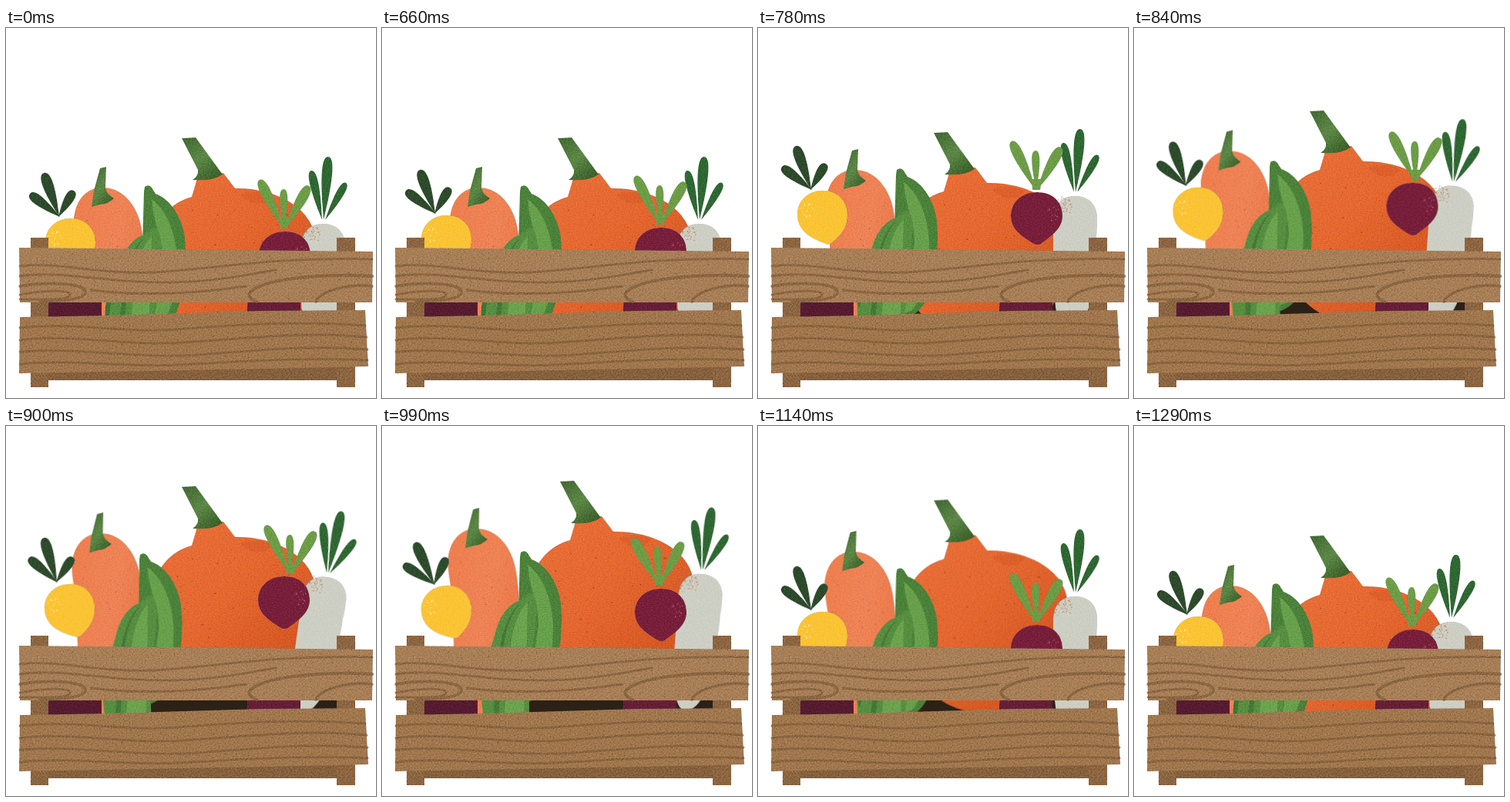
An HTML page for the animation above (1320 ms loop, 480 by 480 pixels).

```html
<!DOCTYPE html>
<html lang="en">
<head>
<meta charset="utf-8">
<title>Vegetable crate</title>
<style>
  html, body { margin: 0; width: 100%; height: 100%; overflow: hidden; background: #fff; }
  main { position: relative; width: 480px; height: 480px; max-height: 100%; overflow: hidden; contain: strict; }
  svg { position: absolute; left: 0; top: 0; width: 480px; height: 480px; }
  .part { will-change: transform; }
  .grain { filter: url(#grain); }
  .wood { filter: url(#wood); }
  .lines { fill: none; stroke: #83603b; stroke-width: 2.8; stroke-linecap: round; opacity: .8; }
</style>
</head>
<body>
<main>
<svg viewBox="0 0 480 480">
  <defs>
    <filter id="grain" filterUnits="userSpaceOnUse" x="0" y="0" width="480" height="480" color-interpolation-filters="sRGB">
      <feTurbulence type="fractalNoise" baseFrequency=".5 .7" numOctaves="2" seed="4"/>
      <feColorMatrix values=".45 0 0 0 .28  .45 0 0 0 .28  .45 0 0 0 .28  0 0 0 0 1" result="noise"/>
      <feBlend in="noise" in2="SourceGraphic" mode="soft-light"/>
      <feComposite in2="SourceGraphic" operator="in"/>
    </filter>
    <filter id="wood" filterUnits="userSpaceOnUse" x="0" y="0" width="480" height="480" color-interpolation-filters="sRGB">
      <feTurbulence type="fractalNoise" baseFrequency=".5 .7" numOctaves="2" seed="9"/>
      <feColorMatrix values=".6 0 0 0 .2  .6 0 0 0 .2  .6 0 0 0 .2  0 0 0 0 1" result="noise"/>
      <feBlend in="noise" in2="SourceGraphic" mode="soft-light"/>
      <feComposite in2="SourceGraphic" operator="in"/>
    </filter>
    <linearGradient id="stem" x1="0" y1="0" x2=".7" y2="1">
      <stop offset="0" stop-color="#3f6630"/><stop offset=".55" stop-color="#5c8845"/><stop offset="1" stop-color="#3b6129"/>
    </linearGradient>
    <linearGradient id="orange" x1="0" y1="0" x2=".9" y2=".9">
      <stop offset="0" stop-color="#ea7039"/><stop offset=".5" stop-color="#e4662e"/><stop offset="1" stop-color="#d0511c"/>
    </linearGradient>
    <linearGradient id="peach" x1="0" y1="0" x2="1" y2=".5">
      <stop offset="0" stop-color="#ee7d4c"/><stop offset=".6" stop-color="#ee8355"/><stop offset="1" stop-color="#ea7747"/>
    </linearGradient>
  </defs>
  <path fill="#2c2117" d="M55 345H429V380H55Z"/>
</svg>

<svg class="part" id="pumpkin" viewBox="0 0 480 480"><g class="grain">
  <path fill="url(#orange)" d="M300 208C350 208 392 232 400 266C408 320 385 419 297 419C215 419 185 345 186 300C187 250 215 226 241 219L248 195L282 188L297 208Z"/>
  <path fill="#cf5220" opacity=".35" d="M303 216Q325 208 346 218Q338 230 322 227Q310 225 303 216Z"/>
  <path fill="url(#stem)" d="M228 143L246 142L281 190Q268 199 242 197Q250 192 249 184Z"/>
  <g data-specks="300 300 92 60 #9c3c14"></g>
</g></svg>

<svg class="part" id="squash" viewBox="0 0 480 480"><g class="grain">
  <path fill="url(#peach)" d="M125 207C149 207 164 225 171 243C177 258 180 280 180 330V450H95L93 300C92 280 88 268 88 249C90 222 105 207 125 207Z"/>
  <path fill="url(#stem)" d="M122 182L130 180L129 208Q131 216 140 221Q133 228 122 229L111 232L114 211Z"/>
  <g data-specks="132 270 40 30 #c4582c"></g>
</g></svg>

<svg class="part" id="turnip" viewBox="0 0 480 480"><g class="grain">
  <g fill="#2d6731" data-leaves="410 249 396 185 10 412 249 418 167 12 414 249 441 201 9"></g>
  <path fill="#cecfc4" d="M411 254C429 254 440 265 440 284L437 352C434 385 426 432 402 432C388 432 384 395 383 352V284C383 265 394 254 411 254Z"/>
  <g data-specks="395 268 13 55 #b5764f"></g>
</g></svg>

<svg class="part" id="zucchini" viewBox="0 0 480 480"><g class="grain">
  <path fill="#4a8138" d="M179 212L180 206Q185 202 189 207L194 215C213 222 226 243 231 265C236 295 232 340 222 367C216 384 205 394 190 400L150 410L177 280Z"/>
  <path fill="#67a04a" d="M189 222C207 235 220 262 222 300C222 340 214 370 200 388L190 392L203 300C203 270 190 250 189 222Z"/>
  <path fill="#568e3f" d="M194 259Q199 262 201 277L191 385V420Q160 432 131 416C128 390 127 365 132 350C143 330 145 315 150 300C156 284 167 271 180 268Q186 260 194 259Z"/>
  <path fill="#3f7233" d="M132 350C138 345 143 340 146 335C138 350 134 360 134 375L131 385C128 375 127 362 132 350Z"/>
  <path fill="#6ba34d" d="M189 270C176 284 169 305 167 330L158 420L184 420L187 340C189 315 188 290 189 270Z"/>
  <path fill="#427836" d="M182 270C167 285 160 305 158 330L151 418L145 416C146 385 150 360 153 330C157 305 165 283 182 270Z"/>
</g></svg>

<svg class="part" id="yellowLeaves" viewBox="0 0 480 480"><g class="grain">
  <g fill="#2c4a2a" data-leaves="70 245 31 215 11.5 69 245 49 188 12.5 68 245 88 211 11"></g>
</g></svg>
<svg class="part" id="yellow" viewBox="0 0 480 480"><g class="grain">
  <path fill="#fac433" d="M84 247C103 247 116 260 116 278C116 298 104 308 95 315Q91 318 86 315C66 308 51 297 51 278C51 260 65 247 84 247Z"/>
  <g data-specks="63 272 10 22 #fff0b8"></g>
</g></svg>

<svg class="part" id="purpleLeaves" viewBox="0 0 480 480"><g class="grain">
  <g fill="#6c9d45" data-leaves="360 260 329 197 12 361 260 360 209 9 362 260 393 205 12"></g>
  <path fill="#6c9d45" d="M355 246H368L366 260H356Z"/>
</g></svg>
<svg class="part" id="purple" viewBox="0 0 480 480"><g class="grain">
  <path fill="#771d39" d="M362 264C383 264 395 277 395 295C395 312 379 322 367 331Q362 334 356 330C342 321 328 312 328 295C328 277 342 264 362 264Z"/>
  <g data-specks="384 292 10 18 #c08a8c"></g>
</g></svg>

<svg viewBox="0 0 480 480">
  <g class="grain" fill="#551a2e"><path d="M55 345H124V380H55Z"/><path fill="#661c36" d="M314 345H382V380H312Z"/></g>
  <g class="wood">
    <path fill="#86603c" d="M55 430H429V457H55Z"/>
    <path fill="#8c6540" d="M32 272H55V466H32ZM429 272H453V466H429Z"/>
    <path fill="#a87f56" d="M17 285L120 286L476 290L475 356H18Z"/>
    <path fill="#a1774d" d="M18 375L130 373L330 367L466 366L467 385L470 439L430 440L230 444L17 448Z"/>
    <g class="lines">
      <path d="M18 309C70 303 120 320 190 317S350 296 475 300"/>
      <path d="M18 322C70 314 130 330 200 330S300 322 350 314"/>
      <path d="M110 340C160 346 230 347 312 335"/>
      <path stroke-width="3.6" d="M18 335C60 328 102 332 103 342S72 354 45 355"/>
      <path d="M18 346C48 340 84 339 83 346S58 352 18 352"/>
      <path stroke-width="4" d="M475 322C420 318 330 324 316 344Q313 350 325 355"/>
      <path stroke-width="3.6" d="M475 335C448 331 408 340 402 355"/>
      <path d="M18 389C90 381 150 396 220 391S370 379 466 386"/>
      <path d="M18 405C80 396 150 413 230 408S390 393 468 401"/>
      <path d="M18 420C90 413 170 430 250 424S390 411 469 417"/>
      <path d="M18 436C90 429 150 441 225 437S380 427 469 431"/>
    </g>
    <g data-specks="110 322 90 45 #755232" data-flat=".33"></g>
    <g data-specks="360 322 100 45 #755232" data-flat=".3"></g>
    <g data-specks="130 410 100 45 #755232" data-flat=".3"></g>
    <g data-specks="350 405 100 45 #755232" data-flat=".3"></g>
  </g>
</svg>
</main>

<script>
const STEP = 30, LOOP = 1320;
const TIMES = [630, 660, 780, 900, 990, 1080, 1170, 1290];

// lift: height at 660–1170 ms; sway and turn: offset and degrees at 900, 990, 1080 ms
const MOVES = {
  pumpkin:      { pivot: [297, 400], lift: [0, -7, -64, -71, -71, -32], sway: [0, 3, 1], turn: [0, 0, 0] },
  squash:       { pivot: [135, 400], lift: [0, -23, -68, -74, -70, -30], sway: [0, 0, 0], turn: [-1, -1, -2.4] },
  turnip:       { pivot: [412, 249], lift: [0, -36, -58, -62, -55, -22], sway: [6, 4, 0], turn: [8, 4.2, 0] },
  zucchini:     { pivot: [185, 400], lift: [0, -22, -39, -42, -35, -13], sway: [-3, 0, 1], turn: [-.9, 0, 0] },
  yellowLeaves: { pivot: [69, 245], lift: [-4, -35, -42, -39, -17, -3], sway: [-3, -1, 0], turn: [3, -5, 0] },
  yellow:       { pivot: [84, 279], lift: [-4, -36, -42, -40, -18, -3], sway: [-1, 0, 0], turn: [-5, -7, 0] },
  purpleLeaves: { pivot: [361, 259], lift: [-5, -50, -68, -53, -18, -3], sway: [8, -1, 0], turn: [0, -2.5, 0] },
  purple:       { pivot: [362, 298], lift: [-5, -51, -69, -53, -18, -3], sway: [-1, 0, 0], turn: [0, 0, 0] }
};

const slope = (v, i) => (v[i + 1] - v[i]) / (TIMES[i + 1] - TIMES[i]);

function tangent(v, i) {
  if (i === 0 || i === v.length - 1) return 0;
  const a = slope(v, i - 1), b = slope(v, i);
  return a * b > 0 ? 2 * a * b / (a + b) : 0;
}

// Monotone cubic curve through the poses
function ease(v, t) {
  if (t <= TIMES[0] || t >= TIMES[TIMES.length - 1]) return 0;
  const i = TIMES.findIndex(k => k > t) - 1;
  const h = TIMES[i + 1] - TIMES[i], u = (t - TIMES[i]) / h;
  const w = u * u * (3 - 2 * u);
  return v[i] * (1 - w) + v[i + 1] * w
    + h * u * (1 - u) * ((1 - u) * tangent(v, i) - u * tangent(v, i + 1));
}

function add(parent, tag, attrs) {
  const el = document.createElementNS("http://www.w3.org/2000/svg", tag);
  for (const k in attrs) el.setAttribute(k, attrs[k]);
  parent.append(el);
}

// Teardrop with a narrow base and a round tip
function leaf(x, y, tx, ty, w) {
  const dx = tx - x, dy = ty - y, len = Math.hypot(dx, dy);
  const nx = -dy / len * w, ny = dx / len * w;
  const mx = x + dx * .4, my = y + dy * .4, k = .45;
  return `M${x} ${y}C${mx + nx * k} ${my + ny * k} ${tx + nx} ${ty + ny} ${tx} ${ty}`
    + `C${tx - nx} ${ty - ny} ${mx - nx * k} ${my - ny * k} ${x} ${y}Z`;
}

let seed = 7;
const random = () => (seed = seed * 16807 % 2147483647) / 2147483647;

for (const g of document.querySelectorAll("[data-leaves]")) {
  const n = g.dataset.leaves.split(" ").map(Number);
  for (let i = 0; i < n.length; i += 5) add(g, "path", { d: leaf(...n.slice(i, i + 5)) });
}

for (const g of document.querySelectorAll("[data-specks]")) {
  const [x, y, r, count, fill] = g.dataset.specks.split(" ");
  const flat = g.dataset.flat || 1;
  for (let i = 0; i < count; i++) {
    const a = random() * 2 * Math.PI, d = r * Math.sqrt(random());
    add(g, "circle", {
      cx: +x + d * Math.cos(a), cy: +y + d * Math.sin(a) * flat,
      r: .4 + random() * .5, fill, opacity: .75
    });
  }
}

const parts = Object.entries(MOVES).map(([id, m]) => {
  const el = document.getElementById(id);
  el.style.transformOrigin = m.pivot.map(p => p + "px").join(" ");
  const pad = v => [0, 0, 0, ...v, 0, 0];
  return { el, x: pad(m.sway), y: [0, ...m.lift, 0], turn: pad(m.turn) };
});

const start = performance.now();
function draw() {
  const now = (performance.now() - start + .5) % LOOP;
  const t = Math.floor(now / STEP) * STEP;
  for (const p of parts) {
    p.el.style.transform = `translate(${ease(p.x, t)}px, ${ease(p.y, t)}px) rotate(${ease(p.turn, t)}deg)`;
  }
  requestAnimationFrame(draw);
}
draw();
</script>
</body>
</html>
```
